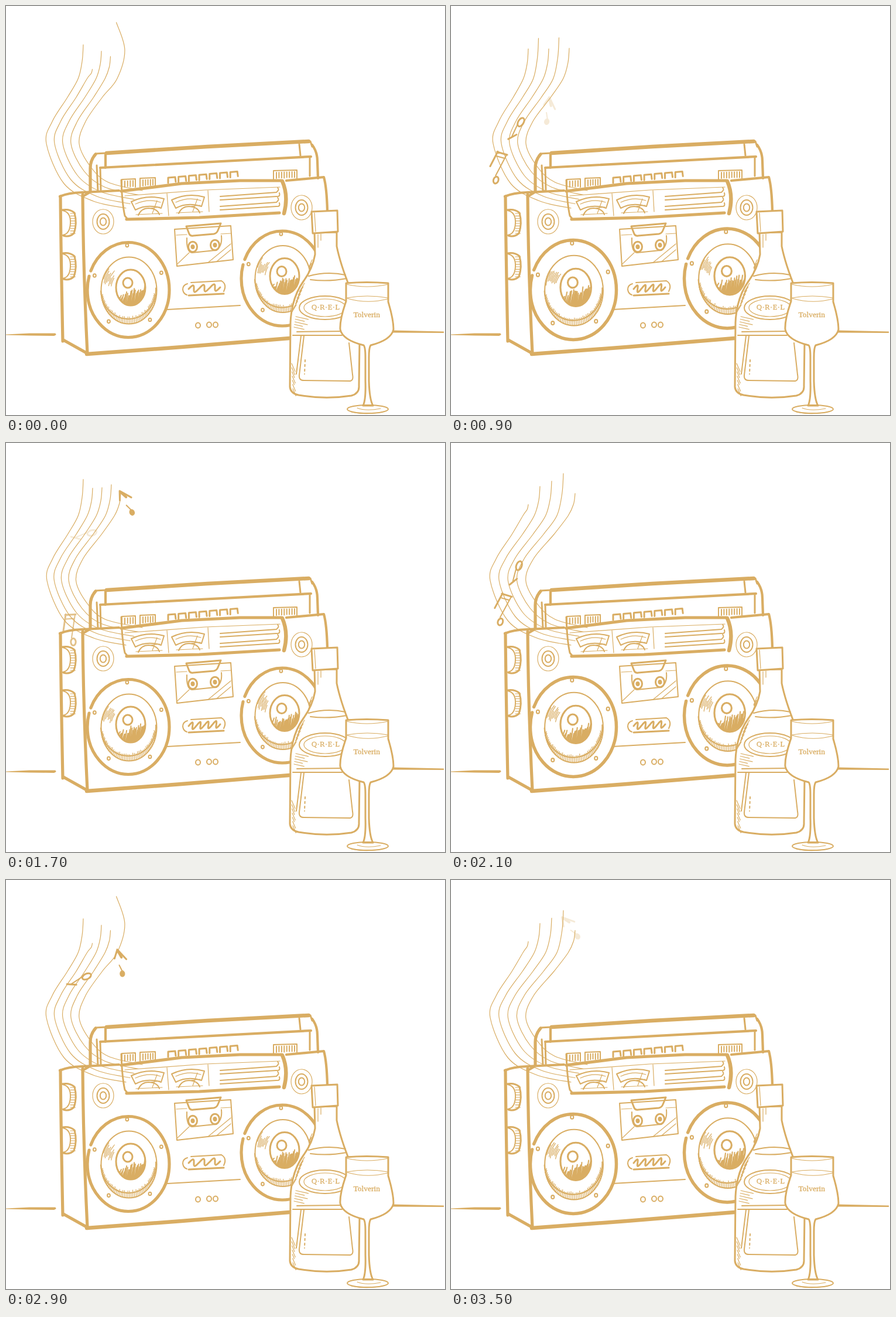
An HTML page for the animation above (3.6 s loop, 750 by 698 pixels).

```html
<!DOCTYPE html>
<html lang="en">
<head>
<meta charset="utf-8">
<title>Boombox and bottle</title>
<style>
html, body { margin: 0; width: 100%; height: 100%; overflow: hidden; background: #fff; }
svg { display: block; width: 750px; height: 698px; fill: none; stroke: #d9ad63; stroke-linecap: round; stroke-linejoin: round; }
.w1 { stroke-width: 1.2 } .w2 { stroke-width: 2 } .w3 { stroke-width: 3 }
.w4 { stroke-width: 4.2 } .w5 { stroke-width: 5.2 } .w6 { stroke-width: 6.5 }
.paper { fill: #fff }
.ink { fill: #d9ad63 }
text { fill: #d9ad63; stroke-width: .3; font-family: "Liberation Serif", serif; }
</style>
</head>
<body>
<svg viewBox="0 0 750 698">
  <defs>
    <g id="meter">
      <path class="w2" d="M-29 -8Q-2 -21 27 -13L22 3Q-2 -5 -22 6ZM-17 15Q-12 3 1 3Q16 4 19 14"/>
      <path class="w1" d="M-21 14L24 12M7 12L15 -10M4 3L20 1M-22 -4Q0 -14 21 -7"/>
    </g>
    <path id="slot" class="w2" d="M366 325L462 318Q468 313 464 310M366 331L462 325Q469 326 467 319"/>
    <g id="dial">
      <path class="w3" d="M96 348Q109 346 117 353Q122 371 116 388Q108 395 98 392"/>
      <path class="w2" d="M97 349Q111 352 110 371Q109 389 97 391"/>
    </g>
    <g id="tweeter">
      <ellipse class="w1" rx="18" ry="21"/>
      <ellipse class="w2" rx="10.5" ry="13"/>
      <ellipse class="w2" rx="5.2" ry="6.5"/>
    </g>
    <g id="reel" class="w3">
      <ellipse rx="7.5" ry="8.7"/>
      <ellipse class="ink w1" rx="3" ry="3.5"/>
    </g>
    <ellipse id="lamp" class="w2" rx="4" ry="4.5"/>
  </defs>

  <g id="table" class="ink" stroke="none">
    <path d="M0 560.5L40 558.5L84 558.5Q88 561 82 563L40 562.5L0 561.5Z"/>
    <path d="M660 553.5L748 555.5V558L660 557.5Z"/>
  </g>

  <g id="handle">
    <path class="w6" d="M172 251L344 240L517 231"/>
    <path class="w5" d="M153 253Q144 263 144 277V316"/>
    <path class="w4" d="M161 276L521 257M170 253V276M523 237Q532 249 532 265L533 294"/>
    <path class="w3" d="M153 252L171 251M155 272L157 315M161 277L162 314M501 236L503 255M520 231L523 240M519 258V290"/>
  </g>

  <g id="body">
    <path class="w6" d="M138 594L300 582L484 567M472 299Q483 324 475 354"/>
    <path class="w5" d="M93 325Q94 430 97 572M131 322Q132 450 139 593M98 570L141 594M197 316L300 303L400 298L471 298M206 364L330 361L467 353"/>
    <path class="w4" d="M92 325Q105 319 131 318L193 315M131 325L143 318M479 298L543 292Q548 310 549 350"/>
    <path class="w3" d="M197 297Q198 335 203 358L208 364"/>
    <path class="w2" d="M276 518L400 511"/>
    <path class="w1" d="M203 324L340 314L468 309M275 320L278 358M345 315L347 351"/>
    <use href="#meter" x="243" y="342"/>
    <use href="#meter" x="312" y="339"/>
    <use href="#slot"/>
    <use href="#slot" y="17"/>
    <use href="#dial"/>
    <use href="#dial" y="74"/>
    <use href="#tweeter" x="166" y="368"/>
    <use href="#tweeter" x="505" y="344"/>
    <path id="ridges" class="w2"/>
    <path id="buttons" class="w3"/>
    <path id="grips" class="w1"/>
  </g>

  <g id="cassette">
    <path class="w2" d="M288 381L384 375L388 433L292 444ZM309 396Q308 420 318 421L357 417Q370 412 368 392"/>
    <path class="w3" d="M308 376L313 389Q315 393 320 392L355 389Q360 388 362 383L367 371Z"/>
    <path class="w1" d="M291 391L309 390M367 389L385 388M293 440L313 421M345 438L384 406M360 436L384 416"/>
    <use href="#reel" x="319" y="411"/>
    <use href="#reel" x="357" y="408"/>
  </g>

  <g id="badge">
    <path class="w2" d="M316 472L368 469Q378 475 372 487M310 474Q302 476 302 484Q303 491 309 493"/>
    <path class="w3" d="M312 494L372 491"/>
    <use href="#lamp" x="328" y="545"/>
    <use href="#lamp" x="347" y="544"/>
    <use href="#lamp" x="358" y="544"/>
  </g>

  <g id="poses"></g>

  <g id="bottle">
    <path class="w3 paper" d="M527 387L528 424Q524 448 508 470Q488 498 486 540L485 650Q486 661 500 664Q545 672 590 665Q604 661 603 648L604 575L588 482Q571 440 565 410V386Z"/>
    <path class="w3 paper" d="M522 351L566 349L567 385L524 388Z"/>
    <path class="w1" d="M527 353L529 385M533 390V412M538 389V400"/>
    <path class="w2" d="M517 461Q548 452 580 459M520 467Q550 471 582 465M497 556L578 555M490 562L574 562"/>
    <path class="w2" d="M509 563L501 630Q500 639 509 639L588 640Q594 639 592 629L586 575M504 563L496 628"/>
    <path id="shading" class="w1"/>
    <path class="w2" stroke-dasharray="3 5" d="M511 604L510 628"/>
    <ellipse class="w2" cx="545" cy="515" rx="44" ry="20"/>
    <ellipse class="w1" cx="545" cy="515" rx="36" ry="15"/>
    <text x="522" y="518" font-size="12.5" letter-spacing=".5">Q·R·E·L</text>
  </g>

  <g id="glass">
    <path class="w3 paper" d="M581 473V504Q570 535 571 552Q575 570 611 579Q614 582 614 600V640Q615 672 610 682H627Q621 672 620 640V600Q620 583 623 579Q658 570 662 552Q662 535 653 505V473Q616 470 581 473Z"/>
    <path class="w1" d="M582 475Q616 483 653 475M583 498Q617 492 652 498M583 499Q617 509 652 500"/>
    <ellipse class="w2" cx="618" cy="688" rx="35" ry="7"/>
    <path class="w1" d="M600 686Q615 692 640 687M590 693Q618 699 646 692"/>
    <text x="593.5" y="531" font-size="13.5" stroke="#d9ad63">Tolverin</text>
  </g>

  <g id="notes">
    <g id="pair">
      <path class="w3" d="M-9 1L9 0M-8 0L-12 28"/>
      <path class="w2" d="M-8 8L7 7M8 0L2 40"/>
      <ellipse class="w3" cx="5" cy="47" rx="4.2" ry="6"/>
    </g>
    <g id="single">
      <ellipse class="w3" rx="4.6" ry="8"/>
      <path class="w2" d="M-3 5L0 29"/>
      <path class="w3" d="M-3 36L5 22"/>
    </g>
    <g id="dark">
      <path class="w3" d="M-6 15L0 0L14 18"/>
      <path class="w4" d="M1 3L6 14"/>
      <path class="w2" d="M1 27L5 37"/>
      <ellipse class="ink w1" cx="5" cy="42" rx="4" ry="5"/>
    </g>
  </g>
</svg>
<script>
const $ = id => document.getElementById(id);
const range = (n, fn) => Array.from({ length: n }, (_, i) => fn(i));
const path = (cls, d) => `<path class="${cls}" d="${d}"/>`;
const oval = (cls, x, y, rx, ry, extra = '') =>
  `<ellipse class="${cls}" cx="${x}" cy="${y}" rx="${rx}" ry="${ry}" ${extra}/>`;
const seg = (x1, y1, x2, y2) =>
  'M' + [x1, y1].map(v => v.toFixed(1)) + 'L' + [x2, y2].map(v => v.toFixed(1));

function random(seed) {
  return () => (seed = (seed * 16807) % 2147483647) / 2147483647;
}

// Row of n strokes of about (dx, dy), starting between two points.
function hatch(n, x1, y1, x2, y2, dx, dy, rough = .15) {
  const rnd = random(n * 1009 + x1);
  return range(n, i => {
    const u = i / (n - 1), x = x1 + (x2 - x1) * u, y = y1 + (y2 - y1) * u;
    const k = 1 - rnd() * rough;
    return seg(x, y, x + dx * k, y + dy * k);
  }).join('');
}

// Smooth curve through the points.
function spline(p) {
  let d = 'M' + p[0];
  for (let i = 0; i < p.length - 1; i++) {
    const a = p[i - 1] || p[i], b = p[i], c = p[i + 1], e = p[i + 2] || c;
    d += 'C' + [b[0] + (c[0] - a[0]) / 6, b[1] + (c[1] - a[1]) / 6,
      c[0] - (e[0] - b[0]) / 6, c[1] - (e[1] - b[1]) / 6, c[0], c[1]].map(v => v.toFixed(1));
  }
  return d;
}

const knob = (x, y, w, n) =>
  `M${x} ${y + 15}V${y}L${x + w} ${y - 1}V${y + 13}` + hatch(n, x + 5, y + 3, x + w - 4, y + 2, 0, 10);
$('ridges').setAttribute('d', knob(198, 296, 23, 4) + knob(229, 294, 26, 5) + knob(457, 281, 40, 8));
$('buttons').setAttribute('d', range(7, i => {
  const x = 277 + i * 17.7, y = 293 - i * 1.6;
  return `M${x} ${y + 9}V${y}L${x + 12} ${y - 1}L${x + 13} ${y + 7}`;
}).join(''));
$('grips').setAttribute('d', hatch(9, 110, 354, 110, 388, 9, 0) + hatch(9, 110, 428, 110, 462, 9, 0));
$('shading').setAttribute('d',
  hatch(7, 510, 473, 496, 510, -9, 15, .5) + hatch(5, 495, 530, 492, 548, 22, 5, .4) +
  hatch(7, 488, 610, 490, 653, 6, 14, .5) + hatch(4, 523, 433, 519, 452, -6, 14, .5));

function speaker(x, y, scale, seed) {
  const rnd = random(seed), capX = 4, capY = -4;
  const at = (deg, rx, ry, cy = 0) =>
    [rx * Math.cos(deg * Math.PI / 180), cy + ry * Math.sin(deg * Math.PI / 180)];
  const rim = range(44, i => {
    const deg = 12 + i * 3.6;
    return seg(...at(deg, 47, 56, 2), ...at(deg, 45, 49 + rnd() * 4, -4));
  }).join('');
  const streaks = range(8, i => {
    const k = .62 + i * .045, from = 188 + rnd() * 14;
    return spline(range(4, j => at(from + j * (6 + rnd() * 4), 48 * k, 57 * k)));
  }).join('');
  const shade = range(24, i => {
    const u = -20 + i * 1.85, edge = 29 * Math.sqrt(1 - (u / 25) ** 2);
    const top = Math.min(edge, 8 - u * .3 + (rnd() - .5) * 12);
    return seg(capX + u + 2, capY + top, capX + u - 1, capY + edge);
  }).join('');
  const screws = range(5, i => oval('w2', ...at(i * 72 - 92, 60, 71, -5), 2.4, 2.8)).join('');
  return `<g transform="translate(${x} ${y}) scale(${scale})">` +
    oval('w5', 0, 0, 70, 81, 'pathLength="100" stroke-dasharray="55 2 43 0"') +
    oval('w2', 1, 1, 47.5, 57) + path('w2', 'M-47 2A46 49 0 0 0 47 -3') +
    path('w1', rim + streaks) +
    oval('w3', capX, capY, 25, 30.5) + path('w2', shade) +
    oval('w3 paper', capX - 5, capY - 8, 8, 8.5) + screws + '</g>';
}

function scribble(waves) {
  return spline(range(waves * 8 + 1, i => {
    const u = i / (waves * 8), s = Math.sin(u * waves * 2 * Math.PI);
    return [312 + u * 54 + 3 * s, 483 - 6 * s - u * 3];
  }));
}

// One smoke line: from its top, round the left bend and into the box.
function smoke(i, { left, gap, spread, tops }) {
  const x = left + i * gap, tx = 132 + i * spread, ty = tops[i], w = tx - x;
  const bulge = Math.max(0, 50 - ty) * .5;
  const points = [[tx - bulge / 2, ty], [x + w * .97 + bulge, (ty + 122) / 2], [x + w * .86 + bulge / 2, 124],
    [x + w * .57, 156], [x + w * .16, 197], [x, 235],
    [x + 30 - i * 2.5, 303 - i * 7], [x + 80 - i * 7.5, 333 - i * 8], [205 + i * 7, 345 - i * 7.5]];
  return path('w1', spline(points));
}

const poses = [
  { scale: 1, waves: 3, left: 69, gap: 14, spread: 15.5, tops: [66, 108, 77, 86, 28] },
  { scale: 1.05, waves: 4, left: 67, gap: 15.2, spread: 20, tops: [105, 74, 65, 52, 86] },
  { scale: 1, waves: 4, left: 70, gap: 12.4, spread: 16, tops: [62, 77, 76, 71, 85] },
  { scale: 1.05, waves: 4, left: 72, gap: 14, spread: 17.5, tops: [73, 55, 73, 54, 72] }
];
$('poses').innerHTML = poses.map((p, n) => '<g>' +
  speaker(209, 484.5, p.scale, 31 + n * 97) + speaker(472, 465, p.scale, 57 + n * 89) +
  path('w3', scribble(p.waves)) + range(5, i => smoke(i, p)).join('') + '</g>').join('');
const poseGroups = [...$('poses').children];

// Each note drifts twice; s is the time since it came into view.
const notes = [
  { el: $('pair'), from: 250, to: 1500, again: 1300,
    move: s => [110 - .00009 * (s - 150) ** 2, 305 - .083 * s, 20 * Math.sin((s - 150) / 270)] },
  { el: $('single'), from: 350, to: 1750, again: 1400,
    move: s => [114 + .000018 * s * s, 229 - .056 * s, 3 + .053 * s] },
  { el: $('dark'), from: 850, to: 1950, again: 1600,
    move: s => [164 + .083 * s - .000056 * s * s, 160 - .092 * s, 15 - .045 * s] }
];

function place({ el, from, to, again, move }, time) {
  const t = time > again + from ? time - again : time;
  const [x, y, turn] = move(t - from);
  el.setAttribute('transform', `translate(${x} ${y}) rotate(${turn})`);
  el.setAttribute('opacity', Math.max(0, Math.min(1, (t - from) / 200, (to - t) / 200)));
}

function draw(now) {
  const time = Math.floor(now % 3600 / 100) * 100;
  const current = Math.floor(time / 120) % poses.length;
  poseGroups.forEach((g, i) => g.setAttribute('visibility', i === current ? 'visible' : 'hidden'));
  notes.forEach(n => place(n, time));
}

const start = performance.now();
function tick() {
  draw(performance.now() - start);
  requestAnimationFrame(tick);
}
tick();
</script>
</body>
</html>
```
